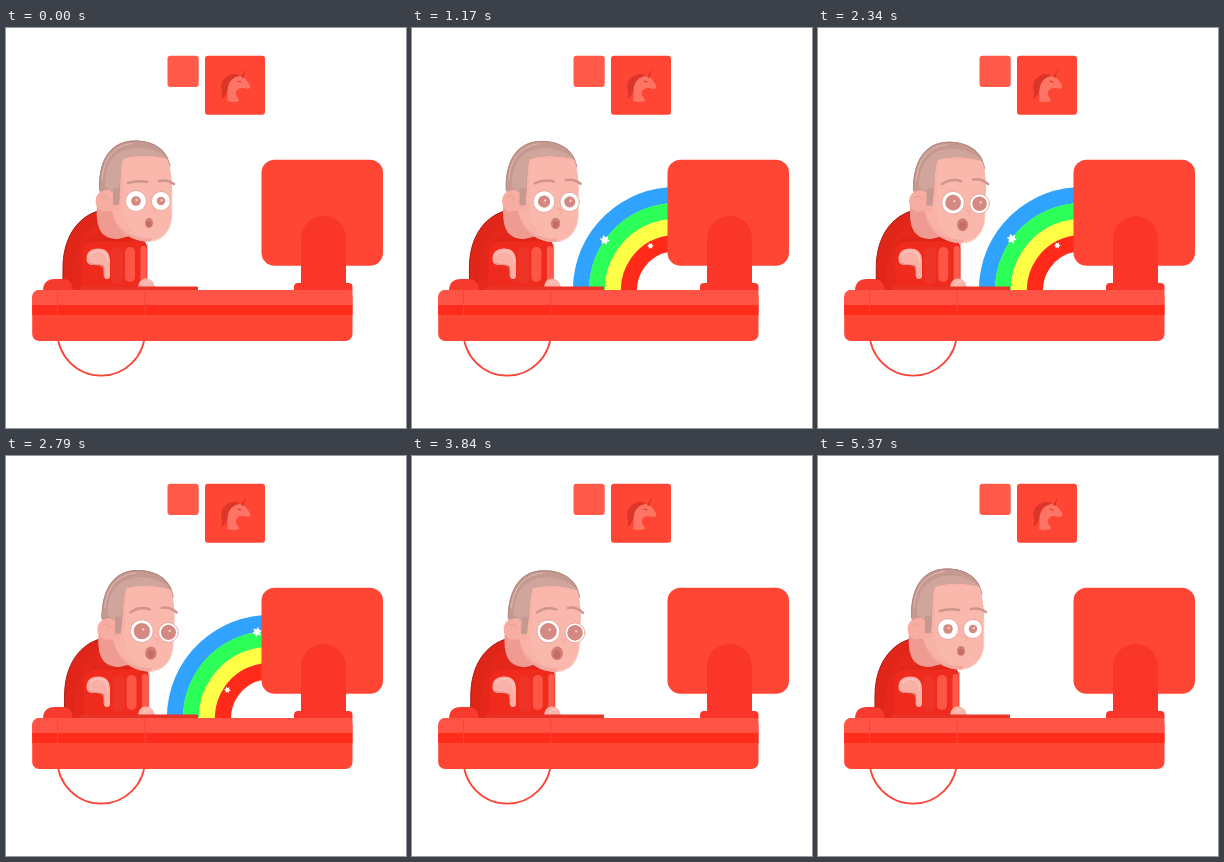
Recreate the animation shown at these times as an HTML page with a canvas. Size 400 px wide and 400 px high, loop 5400 ms.

```html
<!DOCTYPE html>
<html lang="en">
<head>
<meta charset="utf-8">
<title>Rainbow screen</title>
<style>
html, body { margin: 0; width: 100%; height: 100%; overflow: hidden; background: #fff; }
canvas { display: block; width: 100vw; height: 100vh; }
</style>
</head>
<body>
<canvas id="stage"></canvas>
<script>
const LOOP = 5400;
const canvas = document.getElementById('stage');
const ctx = canvas.getContext('2d');

const clamp = u => Math.max(0, Math.min(1, u));
const span = (t, a, b) => clamp((t - a) / (b - a));
const ease = u => u * u * (3 - 2 * u);
const rad = deg => deg * Math.PI / 180;

function fill(d, color) {
  ctx.fillStyle = color;
  ctx.fill(new Path2D(d));
}

function stroke(d, color, width) {
  ctx.strokeStyle = color;
  ctx.lineWidth = width;
  ctx.lineCap = 'round';
  ctx.stroke(new Path2D(d));
}

function box(x, y, w, h, r, color) {
  ctx.fillStyle = color;
  ctx.beginPath();
  ctx.roundRect(x, y, w, h, r);
  ctx.fill();
}

function oval(x, y, rx, ry, color, line) {
  ctx.beginPath();
  ctx.ellipse(x, y, rx, ry, 0, 0, Math.PI * 2);
  ctx.fillStyle = color;
  ctx.fill();
  if (line) {
    ctx.strokeStyle = line;
    ctx.lineWidth = 0.9;
    ctx.stroke();
  }
}

function wallPictures() {
  box(161.5, 27.7, 31.2, 31.2, 3, '#ff5a4a');
  box(199, 27.7, 60, 59, 3, '#ff4533');
  fill('M221 73C223 66 220 62 222 57C225 48 233 46 239 50L244 57Q245 61 241 61C236 59 231 60 230 64C229 68 233 70 233 73Q227 75 221 73Z', '#ff7565');
  fill('M215 71C219 64 211 57 219 50C224 45 231 45 234 48C227 49 223 53 222 59C221 65 219 69 215 71Z', '#dc3529');
  fill('M235 49L240 41L237.500 50Z', '#dc3529');
  stroke('M232 53L235 54', '#dc3529', 1.2);
}

// The bands share one centre and sweep from behind the screen to the desk.
const ARC = { x: 264, y: 262 };
const BANDS = [[95, '#30a2ff'], [79, '#2dff59'], [63, '#ffff45'], [47, '#ff2a1a']];
const sweep = (t, start) => 96 - 106 * ease(span(t, start, start + 700));

function star(radius, angle, size) {
  const x = ARC.x - radius * Math.cos(rad(angle));
  const y = ARC.y - radius * Math.sin(rad(angle));
  ctx.beginPath();
  for (let i = 0; i < 12; i++) {
    const r = i % 2 ? size * 0.55 : size;
    const a = rad(i * 30 + angle * 2);
    ctx.lineTo(x + r * Math.cos(a), y + r * Math.sin(a));
  }
  ctx.closePath();
  ctx.fillStyle = '#fff';
  ctx.fill();
}

function flyingStar(t, start, radius, size) {
  if (t < start || t > 2900) return;
  star(radius, 84 - 73 * ((t - start) / 1187 % 1), size);
}

function rainbow(t) {
  const head = sweep(t, 300);
  const tail = sweep(t, 2678);
  if (tail - head < 0.1) return;
  ctx.save();
  ctx.beginPath();
  ctx.rect(150, 140, 130, 122);
  ctx.clip();
  ctx.lineCap = 'round';
  ctx.lineWidth = 16.2;
  for (const [r, color] of BANDS) {
    ctx.strokeStyle = color;
    ctx.beginPath();
    ctx.arc(ARC.x, ARC.y, r, Math.PI + rad(head), Math.PI + rad(tail));
    ctx.stroke();
  }
  flyingStar(t, 376, 87, 5.2);
  flyingStar(t, 780, 51, 3.4);
  ctx.restore();
}

function torso(lean) {
  ctx.save();
  ctx.translate(lean * 1.8, 0);
  fill('M56.500 262L57 240C57 208 73 188 94 182L112 204L138 212Q141 216 141 222V262Z', '#df2619');
  stroke('M57 258V240C57 208 73 188 93 183', '#ab1c14', 1);
  fill('M66 262C64 232 76 200 95 191L106 210H84C77 222 76 240 77 262Z', '#e5281b');
  box(76, 213.5, 65, 49, [12, 6, 0, 0], '#ef2b1e');
  box(105, 219, 12, 37, 6, '#ee3327');
  box(119, 219, 10, 35, 5, '#ff5546');
  box(134.5, 218, 6, 36, 3, '#ff5b4d');
  stroke('M141.300 216V252', '#e0776d', 0.7);
  fill('M91 176C89 202 96 211 112 211L124 208L116 176Z', '#f09b91');
  ctx.restore();

  // Bent forearm and the hand on the keys
  fill('M80.500 231C80.500 224 85 220.500 92 220.500C100 220.500 104 225 104 233V248Q104 251 101 251Q98 251 98 248V239Q97 237 94 237H87Q80.500 237 80.500 231Z', '#f9b0a6');
  stroke('M83 235Q87 237 94 237Q98 238 98 243V248', '#e58a80', 1);
  stroke('M84 227Q88 222 94 223Q101 224 102 234', '#fdc5bc', 1.3);
  fill('M132 259Q133 251 139 250.500Q147 250 149 259Z', '#f9b4aa');
  stroke('M138 256Q140 252.500 144 254', '#fccbc3', 1.2);
}

function eye(x, y, r, pupil) {
  oval(x, y, r, r, '#fff', '#e3a49b');
  oval(x, y, pupil, pupil, '#d48a82');
  oval(x + pupil * 0.15, y - pupil * 0.2, 1.2, 1.2, '#f3cdc7');
}

function face(lean, look) {
  ctx.save();
  ctx.translate(110 + 0.6 * lean, 205 + 0.8 * lean);
  ctx.rotate(rad(2.7 * lean));
  ctx.translate(-110, -205);

  const skull = 'M93.300 160C92.500 130 106 112.500 129 112.500C152 112.500 163 127 164 141C165 147 166.500 156 166 168V186C166 203 156 213.500 143 213.500C128 213.500 111 206 106 184Z';
  fill(skull, '#f8b2a7');
  ctx.save();
  ctx.clip(new Path2D(skull));
  fill('M117 130H170V215H150C126 209 117 198 117 180Z', '#fab7ac');
  fill('M105 181C112 205 128 211 146 210L143 216L105 213Z', '#f2a79c');
  ctx.restore();

  fill('M93.300 160C92.500 130 106 112.500 129 112.500C148 112.500 158 121 162.500 131C148 127 131 126 117 131C114 136 115 150 114 160L113 177H107V166C104 160 98 161 94 166Z', '#c59890');
  fill('M99 159C98 134 110 121 130 119.500C144 119.500 155 124 162 131C148 127 131 126 117 131C114 136 115 150 113 160L107 166Q103 160 99 159Z', '#d0a59c');
  stroke('M93.500 162C92.500 130 106 113 129 113C149 113 161 123 164 138', '#ad8780', 0.9);
  stroke('M96 152C97 131 108 117.500 126 115.500', '#e5c4bf', 0.8);
  stroke('M166 163V186C166 202 157 212 145 212.700', '#fce0da', 0.8);

  oval(99, 173, 9.5, 10.5, '#f7ada2');
  fill('M98 164H113V183H102Z', '#f7ada2');
  fill('M107 160H114L113 177H107Z', '#c59890');
  stroke('M95 169Q99 166 102 171', '#ee9e93', 1);

  const lift = look * 4;
  stroke(`M122 155Q131 ${152 - lift} 141 ${154 - lift * 0.7}`, '#cf958c', 2.5);
  stroke(`M153 ${153 - lift}Q161 ${151 - lift} 168 ${156 - lift * 0.7}`, '#cf958c', 2.5);

  const pupil = 4.8 + 3.6 * look;
  eye(155 + 6 * look, 173 + 0.6 * look, 9.5 + 0.4 * look, pupil - 0.6);
  eye(130 + 4.3 * look, 173 + 0.4 * look, 10.5 + look, pupil);
  stroke(`M${144 + 3 * look} 180Q${151 + 2 * look} 181 ${148 + 2 * look} 185`, '#f2a69b', 1.2);

  const grow = look * 1.8;
  oval(143 + look, 195, 4 + grow, 5 + grow, '#d17e75');
  oval(143 + look, 196, 2.4 + grow * 0.6, 3 + grow * 0.6, '#c36d65');
  ctx.restore();
}

function furniture() {
  // Chair ring
  stroke('M51.500 304A43.700 43.700 0 0 0 138.900 304', '#fb4437', 1.8);
  // Monitor
  box(255.5, 131.8, 121.5, 106, 13, '#ff4533');
  box(295, 188, 45, 72, [22.5, 22.5, 0, 0], '#f93629');
  box(288, 255, 58.5, 8, [4, 4, 0, 0], '#f93629');
  // Arm rest and keyboard
  fill('M37 263Q37 251 49 251H57Q66 251 67 263Z', '#f63b2e');
  box(74, 258.5, 118, 4, [1, 1, 0, 0], '#ea3327');
  // Desk
  box(26.2, 262, 320.3, 51, 7, '#ff4533');
  box(26.2, 262, 320.3, 15, [7, 2, 0, 0], '#ff5345');
  ctx.fillStyle = '#ff2b1b';
  ctx.fillRect(26.2, 277, 320.3, 10);
  stroke('M51.500 263V286M138.900 263V286', '#f6453a', 1);
}

function draw(t) {
  ctx.setTransform(canvas.width / 400, 0, 0, canvas.height / 400, 0, 0);
  ctx.fillStyle = '#fff';
  ctx.fillRect(0, 0, 400, 400);
  const lean = span(t, 600, 3100) * (1 - ease(span(t, 4000, 4640)));
  const look = (0.72 * ease(span(t, 720, 1600)) + 0.28 * span(t, 1600, 3100))
    * (1 - ease(span(t, 4000, 5300)));
  wallPictures();
  rainbow(t);
  torso(lean);
  face(lean, look);
  furniture();
}

function resize() {
  const ratio = window.devicePixelRatio || 1;
  canvas.width = Math.round(innerWidth * ratio);
  canvas.height = Math.round(innerHeight * ratio);
}

addEventListener('resize', resize);
resize();
const begin = performance.now();
function tick() {
  draw((performance.now() - begin) % LOOP);
  requestAnimationFrame(tick);
}
tick();
</script>
</body>
</html>
```
